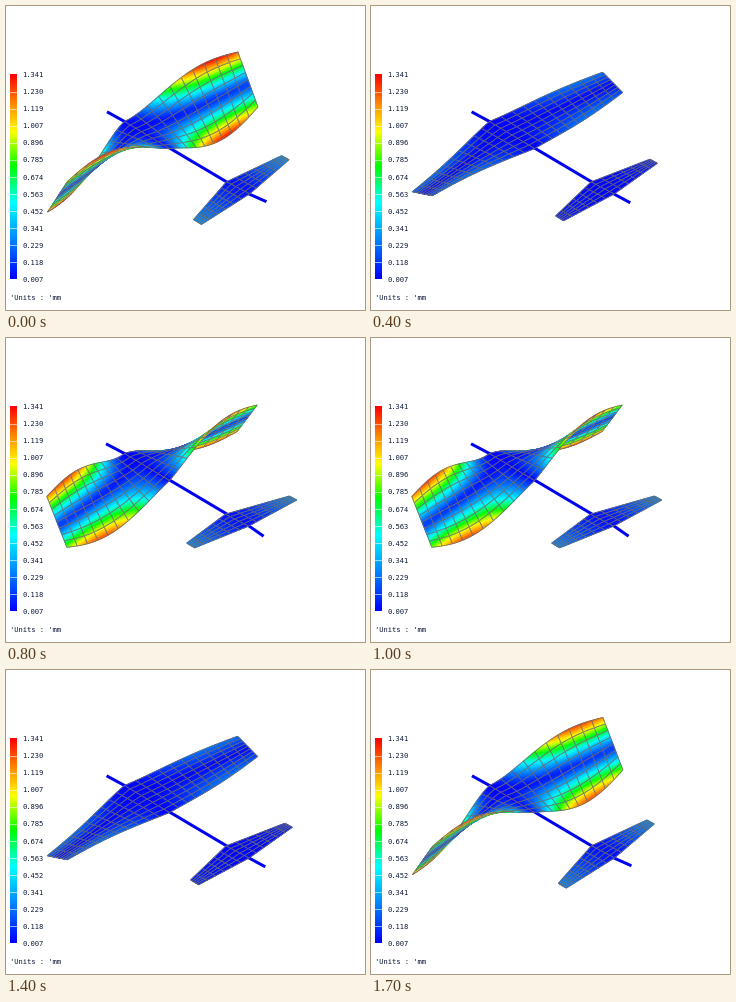
A matplotlib script for the animation above (1.8 s loop, 359 by 304 pixels).

```python
import numpy as np
import matplotlib.pyplot as plt
from matplotlib.animation import FuncAnimation
from matplotlib.collections import PolyCollection
from matplotlib.colors import LinearSegmentedColormap

W, H, DPI = 359, 304, 64
PX = 72 / DPI  # one pixel in points
FRAMES, STEP = 18, 100
GRID = "#6e6e6e"
INK = "#0c1838"
V_MIN, V_MAX = 0.007, 1.341
PEAK = 26.8  # screen displacement of the largest value

rainbow = LinearSegmentedColormap.from_list("rainbow", [
    (0, "#0000ff"), (0.2, "#008cff"), (0.37, "#00ffff"), (0.55, "#00ff00"),
    (0.72, "#ffff00"), (0.85, "#ff9000"), (1, "#ff0000")], N=512)


def quartic(values):
    """Smooth curve through five evenly spaced values on 0..1."""
    return np.poly1d(np.polyfit(np.linspace(0, 1, 5), values, 4))


lead_bend = quartic([0, 9, 21.5, 27, 24.5])
trail_bend = quartic([0, 14, 24.5, 25.5, 17.5])


def blend(a, b, t):
    return np.asarray(a) + (np.asarray(b) - np.asarray(a)) * t[..., None]


def wing(lead_tip, trail_tip, side):
    """Rest position and full displacement for one wing half."""
    def rest(t, v):
        lead = blend((118, 115), lead_tip, t)
        trail = blend((163, 142), trail_tip, t)
        return lead + (trail - lead) * v[..., None]

    def shift(t, v):
        dy = -lead_bend(t) * (1 - v) + trail_bend(t) * v
        return np.stack([0.4 * t, side * dy], axis=-1)

    return rest, shift, 2.5


def tail(lead_tip, trail_tip, tip_shift):
    def rest(t, v):
        lead = blend((219.5, 175.5), lead_tip, t)
        trail = blend((242.5, 187.5), trail_tip, t)
        return lead + (trail - lead) * v[..., None]

    def shift(t, v):
        return blend((0.6, -0.2), tip_shift, t)

    return rest, shift, 0


# part, span cells, chord cells, subdivisions, tip painted first
PARTS = [
    (wing((231, 70), (251, 83), 1), 10, 8, 4, True),
    (wing((40.7, 181), (60.7, 192.3), -1), 10, 8, 4, False),
    (tail((279, 153.5), (286.5, 157.5), (-4, -4.3)), 6, 5, 2, True),
    (tail((183.5, 208.7), (191.5, 213.5), (3.5, 4.4)), 6, 5, 2, False),
]


def mesh(part, spans, chords, sub, tip_first, s):
    """Polygons with face and edge colours, back to front."""
    rest, shift, drift = part
    t, v = np.meshgrid(np.linspace(0, 1, spans * sub + 1),
                       np.linspace(0, 1, chords * sub + 1), indexing="ij")
    move = shift(t, v)
    pts = rest(t, v) + s * move + 0.5
    size = np.sqrt((move ** 2).sum(-1) + (drift * t) ** 2) * abs(s) / PEAK
    mid = (size[:-1, :-1] + size[1:, :-1] + size[:-1, 1:] + size[1:, 1:]) / 4
    fill = rainbow(np.clip(mid, 0, 1))

    polys, faces, edges = [], [], []
    order = range(spans)[::-1] if tip_first else range(spans)
    for i in order:
        for j in range(chords):
            a, b = i * sub, j * sub
            for p in range(a, a + sub):
                for q in range(b, b + sub):
                    polys.append(pts[[p, p + 1, p + 1, p],
                                     [q, q, q + 1, q + 1]])
                    faces.append(fill[p, q])
                    edges.append(fill[p, q])
            k = np.arange(sub)
            rows = np.r_[a + k, 0 * k + a + sub, a + sub - k, 0 * k + a]
            cols = np.r_[0 * k + b, b + k, 0 * k + b + sub, b + sub - k]
            polys.append(pts[rows, cols])
            faces.append((0, 0, 0, 0))
            edges.append(plt.matplotlib.colors.to_rgba(GRID))
    return polys, faces, edges


fig = plt.figure(figsize=(W / DPI, H / DPI), dpi=DPI, facecolor="white")
ax = fig.add_axes([0, 0, 1, 1])
ax.set_xlim(0, W)
ax.set_ylim(H, 0)
ax.axis("off")


def label(x, y, text):
    ax.text(x, y, text, family="DejaVu Sans Mono", fontsize=7.1 * PX,
            color=INK, ha="left", va="center_baseline")


# legend
ax.imshow(np.linspace(1, 0, 205)[:, None], cmap=rainbow, aspect="auto",
          extent=(4, 11, 273, 68), interpolation="nearest")
ax.set_xlim(0, W)
ax.set_ylim(H, 0)
for n in range(13):
    y = 68.5 + n * 205 / 12
    value = V_MAX + (V_MIN - V_MAX) * n / 12
    if 0 < n < 12:
        ax.plot([4, 11], [y, y], color="white", alpha=0.6, lw=PX)
    label(16.5, y, f"{value:.3f}")
label(3.5, 291.5, "'Units : 'mm")

body, = ax.plot([], [], color="#0000f0", lw=3 * PX, zorder=2,
                solid_capstyle="butt", solid_joinstyle="round")
skin = PolyCollection([], linewidths=0.8 * PX, zorder=3)
ax.add_collection(skin)


def draw(i):
    s = np.cos(2 * np.pi * i / FRAMES)
    body.set_data([100.5 + 0.5 * s, 118.5, 163.5, 220, 243, 259 + 1.5 * s],
                  [105.8, 115.5, 142, 175.5, 188, 197 - 1.3 * s])
    polys, faces, edges = [], [], []
    for args in PARTS:
        p, f, e = mesh(*args, s)
        polys += p
        faces += f
        edges += e
    skin.set_verts(polys)
    skin.set_facecolor(faces)
    skin.set_edgecolor(edges)
    return body, skin


anim = FuncAnimation(fig, draw, frames=FRAMES, interval=STEP,
                     repeat=True, repeat_delay=0, blit=False)
plt.show()
```
